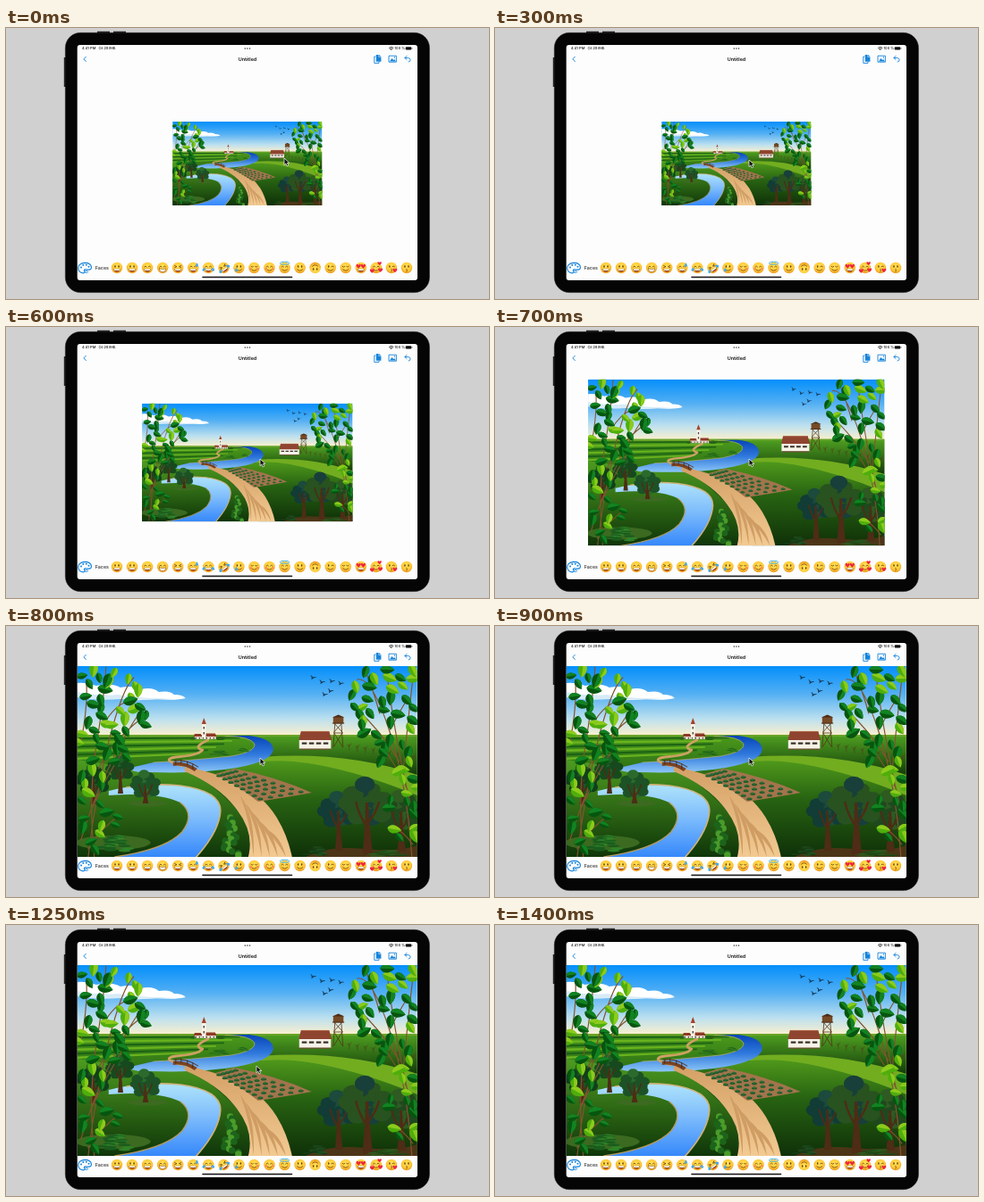
Write an HTML page that moves like this. It is 540x304 px and loops after 1450 ms.

```html
<!DOCTYPE html>
<html lang="en">
<head>
<meta charset="utf-8">
<title>Tablet zoom</title>
<style>
html, body { margin: 0; width: 100%; height: 100%; overflow: hidden; background: #d0d0d0; }
svg { display: block; width: 100vw; height: 100vh; }
text { font-family: Inter, Roboto, sans-serif; fill: #111; }
</style>
</head>
<body>
<svg viewBox="0 0 540 304">
  <defs>
    <linearGradient id="sky" x2="0" y2="1"><stop stop-color="#048ffb"/><stop offset=".4" stop-color="#55b0f3"/><stop offset=".75" stop-color="#bce0ef"/><stop offset="1" stop-color="#fff1cb"/></linearGradient>
    <linearGradient id="land" x2="0" y2="1"><stop stop-color="#4c9a1c"/><stop offset=".3" stop-color="#2c7014"/><stop offset=".65" stop-color="#1b4a0d"/><stop offset="1" stop-color="#0b2606"/></linearGradient>
    <linearGradient id="hill" x2="0" y2="1"><stop stop-color="#4f981b"/><stop offset=".4" stop-color="#276312"/><stop offset="1" stop-color="#0f3008"/></linearGradient>
    <linearGradient id="bank" x2="0" y2="1"><stop stop-color="#4d9c20"/><stop offset="1" stop-color="#0f3509"/></linearGradient>
    <linearGradient id="far" x2="0" y2="1"><stop stop-color="#0745b8"/><stop offset=".5" stop-color="#2f78dc"/><stop offset="1" stop-color="#8cc6f8"/></linearGradient>
    <linearGradient id="near" x2="0" y2="1"><stop stop-color="#aee3fa"/><stop offset=".45" stop-color="#7fbdfc"/><stop offset="1" stop-color="#3588fb"/></linearGradient>
    <linearGradient id="sand" x2="0" y2="1"><stop stop-color="#d4a066"/><stop offset="1" stop-color="#f2ca92"/></linearGradient>
    <radialGradient id="face" cy=".38" r=".62"><stop stop-color="#ffe45c"/><stop offset=".65" stop-color="#ffc935"/><stop offset="1" stop-color="#ea951c"/></radialGradient>
    <clipPath id="frame"><path d="M80 45h380v214H80z"/></clipPath>
  </defs>
  <path fill="#d0d0d0" d="M0 0h540v304H0z"/>
  <path fill="#222" d="M102 3.8h14v3h-14zm18 0h14v3h-14zM64.8 33h3v33h-3z"/>
  <rect x="66.3" y="5.3" width="407.2" height="291.4" rx="17" fill="#050505" stroke="#2a2a2c" stroke-width=".5"/>
  <rect x="79.7" y="19" width="380.3" height="264" rx="3" fill="#fdfdfd"/>
  <g id="picture" clip-path="url(#frame)"></g>
  <g id="ui"></g>
  <path id="cursor" d="M0 0v7.6l1.8-1.6 1.3 2.9 1.6-.8-1.3-2.7h2.5z" fill="#111" stroke="#fff" stroke-width=".7"/>
</svg>
<script>
const $ = id => document.getElementById(id);
const fill = (d, color) => `<path d="${d}" fill="${color}"/>`;
const line = (d, color, width) =>
  `<path d="${d}" fill="none" stroke="${color}" stroke-width="${width}" stroke-linecap="round" stroke-linejoin="round"/>`;
const oval = (x, y, rx, ry, color) => `<ellipse cx="${x}" cy="${y}" rx="${rx}" ry="${ry}" fill="${color}"/>`;
const box = (x, y, w, h, color) => fill(`M${x} ${y}h${w}v${h}h${-w}z`, color);
const place = (x, y, art, angle = 0, scale = 1) =>
  `<g transform="translate(${x} ${y}) rotate(${angle}) scale(${scale})">${art}</g>`;
const times = (n, draw) => Array.from({ length: n }, (_, i) => draw(i)).join('');
const random = n => { const v = Math.sin(n * 127.1 + 3) * 43758.5453; return v - Math.floor(v); };

// Landscape
function tree(x, y, r, foot, color, light, seed) {
  const crown = times(18, i => {
    const a = i * 2.4, d = r * .72 * Math.sqrt(i / 18), s = r * (.24 + .14 * random(seed + i));
    return oval(x + d * Math.cos(a), y + d * Math.sin(a), s, s * .8, i % 4 == 3 ? light : color);
  });
  const bark = '#4e2c15', fork = y + r * .75;
  return crown + fill(`M${x - r * .17} ${foot}Q${x - r * .06} ${fork} ${x - r * .06} ${y}h${r * .1}Q${x + r * .08} ${fork} ${x + r * .2} ${foot}z`, bark) +
    line(`M${x} ${fork + r * .15}Q${x - r * .3} ${fork - r * .3} ${x - r * .4} ${y}M${x} ${fork}Q${x + r * .3} ${fork - r * .3} ${x + r * .42} ${y}`, bark, r * .08);
}

function bush(x, y, w, h, color, light) {
  return times(22, i => {
    const v = i / 21, side = (random(i + x) - .5) * w * (.2 + .7 * v);
    return oval(x + side, y + h * v, w * .17, h * .09, i % 3 ? color : light);
  });
}

const leafHalf = 'M-8 0C-5-7 3-6 9 0z', leafShape = leafHalf + 'M-8 0C-5 7 3 6 9 0z';
function leaf(x, y, seed) {
  const [dark, light] = random(seed + 5) > .72 ? ['#4fae0c', '#8ccb1c'] : ['#07550f', '#128322'];
  return place(x, y, fill(leafShape, dark) + fill(leafHalf, light), random(seed) * 150 - 30, .7 + .35 * random(seed + 9));
}
const leaves = (points, seed) => points.map(([x, y], i) =>
  leaf(x + 18 * random(seed + i) - 9, y + 9, seed + i * 2 + 100) + leaf(x, y, seed + i * 3)).join('');

const leftLeaves = [[98, 49], [115, 62], [121, 52], [137, 59], [148, 72], [85, 56], [89, 79], [106, 83], [139, 84],
  [150, 91], [128, 95], [151, 102], [107, 101], [118, 111], [92, 108], [134, 118], [127, 128], [101, 126], [85, 121],
  [113, 143], [97, 151], [131, 138], [85, 168], [108, 169], [92, 187], [105, 200], [125, 214], [107, 224], [95, 242], [87, 216]];
const rightLeaves = [[402, 51], [412, 59], [426, 49], [441, 58], [455, 50], [391, 68], [404, 82], [421, 85], [448, 83],
  [432, 71], [390, 91], [407, 98], [398, 111], [438, 99], [455, 106], [414, 122], [429, 128], [443, 133], [422, 142],
  [451, 152], [439, 163], [456, 172], [448, 188], [430, 195], [456, 202], [434, 228], [457, 226]];

const twigs = 'M92 260Q100 190 115 130T143 58M99 260Q92 190 101 135T112 46M84 240Q108 160 152 93' +
  'M84 130Q92 90 90 60M104 160Q118 130 150 105M96 205Q112 170 132 138M92 250Q108 225 128 212M110 110Q120 90 139 83';
const rightTwigs = 'M454 260Q449 180 429 118T393 60M455 210Q437 140 425 46M440 152Q420 118 391 92' +
  'M444 166Q450 100 456 52M452 190Q438 158 412 121M455 245Q444 230 434 226M430 116Q440 96 449 82M418 98Q412 76 402 50';

const bird = fill('M-4.5-1.5Q-2-2.5 0-.6Q1.5-3 4.5-3Q2-1.5 1 .8L0 3-1 .8Q-2-1-4.5-1.5z', '#143a58');
const birds = [[343, 58], [353, 63], [364, 62], [374, 64.5], [356, 77], [362.5, 73]];

const church =
  fill('M211 121h7l2 4h-10zM223 120.5h11l2 4h-14z', '#8f3a28') +
  box(211, 124, 8, 3, '#e6dccb') + box(224, 124, 11, 3, '#e6dccb') +
  box(219.2, 110, 4.6, 17, '#f8f2e6') + fill('M219 110l2.5-7 2.5 7z', '#a5402a') +
  box(220.8, 113, 1.4, 2.5, '#444') + box(220.8, 119, 1.4, 2.5, '#444') +
  times(6, i => box(212 + i * 4, 125, 1.2, 1.6, '#433')) + oval(240, 126, 5, 2, '#276218') + oval(209, 126, 3, 1.6, '#276218');

const barn = box(328, 127, 35.5, 11, '#f6f2e8') + fill('M330 118h31.5l3 10h-37z', '#8f4430') +
  line('M331 118.4h30', '#b5694a', .8) + box(328, 137.4, 35.5, 1.3, '#6d4b30') +
  times(4, i => box(331 + i * 8, 130.5, 5.5, 2.2, '#3a302a'));

const tower = line('M366 136l2-27M377 136l-2-27M368 110l8 9M375 110l-8 9M367 120l9 15M376 120l-9 15M367.5 120h9', '#553318', .8) +
  fill('M366 102h11.5v7.5h-11.5z', '#774925') + fill('M365 102.5l6.8-3 6.8 3z', '#4d2c16') + line('M365.5 109h12.5', '#4d2c16', 1);

const fields = times(6, i => fill(`M80 ${125 + i * 4.5}L${262 - i * 9} ${124.5 + i * 3.5}v1.7L80 ${127.4 + i * 4.5}z`, i % 2 ? '#6ab41f' : '#1c6314'));

const crops = times(5, row => times(8, col => {
  const u = (col + .5) / 8, v = (row + .5) / 5;
  const x = 254 - 21 * v + 87 * u - 38 * u * v, y = 161 + 26 * u + 6 * v + 4 * u * v;
  return oval(x, y, 3.1, 1.3, '#1f5a2a') + oval(x - .3, y - 1, 1.7, 1, '#2e7038');
}));

$('picture').innerHTML =
  box(80, 45, 380, 79, 'url(#sky)') +
  fill('M80 64Q91 63 101 67Q119 63 128 69Q143 66 151 71Q164 68 171 74Q184 72 188 77Q198 77 201 81Q190 84 168 82Q140 85 122 80Q100 83 80 77z', '#fff') +
  fill('M80 74Q105 79 125 77Q152 82 190 81Q160 84 128 82Q100 84 80 80z', '#d7ebf7') +
  birds.map(([x, y]) => place(x, y, bird, 30, .85)).join('') +
  box(80, 122, 380, 137, 'url(#land)') +
  box(80, 122, 380, 2.5, '#6ba529') + fields +
  fill('M290 124H460V170Q380 142 290 147z', 'url(#bank)') +
  fill('M285 147Q380 140 460 167V193Q390 166 282 152z', '#72ad20') +
  fill('M245 161Q290 145 345 155T460 190V259H290z', 'url(#hill)') +
  fill('M80 150Q140 160 210 163Q245 190 278 225L270 259H80z', 'url(#bank)') +
  // Upper river
  fill('M245 123Q273 124 278 132Q280 141 252 146Q205 151 165 153L135 160Q145 165 160 164Q220 166 258 159Q297 152 299 139Q299 126 272 123z', 'url(#far)') +
  line('M246 123.5Q273 124 278 132Q280 141 252 146Q205 151 165 153', '#b9b06a', .7) +
  bush(239, 140, 22, 5, '#1e5f18', '#37851f') + bush(265, 137, 14, 4, '#1e5f18', '#37851f') +
  line('M226 128Q208 136 220 139Q216 145 190 147Q172 150 197 157', '#cda064', 2.8) +
  // Lower river
  fill('M115 185Q155 175 195 179Q240 185 240 207Q239 230 213 259H122Q178 251 197 231Q212 211 195 198Q170 186 115 190z', 'url(#near)') +
  line('M135 181Q165 176 195 179Q240 185 240 207Q239 230 213 259', '#cdb277', 1.7) +
  line('M122 259Q178 251 197 231Q212 211 195 198', '#b29a5c', 1.3) +
  // Road
  fill('M200 158Q219 161 243 169Q284 184 303 215Q315 235 320 259H271Q278 232 259 207Q240 180 200 163z', 'url(#sand)') +
  times(5, i => fill(`M${262 + i * 6} ${190 + i * 9}Q${279 + i * 7} ${212 + i * 5} ${277 + i * 9} 259Q${274 + i * 7} ${222 + i * 4} ${262 + i * 6} ${190 + i * 9}z`, '#cf9d64')) +
  fill('M187 153Q200 151 214 160L211 163Q199 155 187 157z', '#7b4322') +
  line('M188 151Q201 149 215 158M190 151v4M196 150v4M203 152v4M209 155v5', '#4b2611', .9) +
  fill('M256 160Q302 169 342 187Q315 192 282 197Q258 178 234 166z', '#a2744c') + crops +
  church + barn + tower +
  times(9, i => line(`M${384 + i * 9} ${139 + i * 1.6}v-6m0 3l-2-3m2 2l2-3`, '#4d4a1b', .7)) +
  oval(120, 243, 42, 8, '#3b6a20') + oval(158, 199, 22, 3.5, '#3b6a20') +
  tree(98, 172, 20, 200, '#123f1c', '#1c5523', 3) +
  tree(128, 160, 16, 188, '#164a1e', '#22602a', 4) + tree(156, 178, 18, 199, '#1c5226', '#2b6a2c', 9) +
  bush(252, 215, 22, 42, '#1d641b', '#4a9c2a') + bush(122, 236, 42, 16, '#1a5c1d', '#2f8228') +
  fill('M335 259Q360 246 400 250T460 246V259z', '#4c3517') +
  tree(372, 207, 23, 252, '#123c36', '#1c4a3c', 2) + tree(442, 208, 26, 253, '#20481e', '#2f5a22', 7) +
  tree(404, 198, 31, 256, '#28521f', '#183f39', 5) +
  bush(348, 248, 30, 9, '#163c17', '#245321') + bush(428, 252, 50, 6, '#1d4a17', '#2c6321') +
  line(twigs, '#80542f', 1.2) + line(rightTwigs, '#80542f', 1.2) +
  leaves(leftLeaves, 11) + leaves(rightLeaves, 60);

// Emoji row
const ink = '#6b3a10';
const heart = (x, y, s) => place(x, y, fill('M0 2.4C-5-1-2-4 0-1.5C2-4 5-1 0 2.4z', '#ee263c'), 0, s);
const drop = (x, y, angle = 0) => place(x, y, fill('M0-2.3Q2.8 2 0 2.2Q-2.8 2 0-2.3z', '#3ba9f2'), angle);
const eyes = {
  dot: oval(-2, -1.5, .75, 1.2, ink) + oval(2, -1.5, .75, 1.2, ink),
  arc: line('M-3.5-1q1.4-2 2.6 0M.9-1q1.3-2 2.6 0', ink, .8),
  shut: line('M-3.5-1.5q1.4 1.6 2.6 0M.9-1.5q1.3 1.6 2.6 0', ink, .8),
  squint: line('M-3.6-2.5l2.4 1.2-2.4 1M3.6-2.5l-2.4 1.2 2.4 1', ink, .8),
  wink: oval(-2, -1.5, .75, 1.2, ink) + line('M.9-1.3q1.3-1.6 2.8 0', ink, .8),
  love: heart(-2.6, -1.6, .95) + heart(2.6, -1.6, .95)
};
const mouths = {
  open: fill('M-3.8 1Q0 2 3.8 1Q3.3 4.6 0 4.6Q-3.3 4.6-3.8 1z', ink) + fill('M-3.4 1.2Q0 2 3.4 1.2L2.8 2.9H-2.8z', '#fff') + oval(0, 4, 1.5, .5, '#e64a4d'),
  teeth: fill('M-3.8 1Q0 2 3.8 1Q3.3 4.7 0 4.7Q-3.3 4.7-3.8 1z', '#fff') + line('M-3.8 1Q0 2 3.8 1Q3.3 4.7 0 4.7Q-3.3 4.7-3.8 1z', ink, .5),
  smile: line('M-3 1.8Q0 4.8 3 1.8', ink, .8),
  kiss: line('M-.3 1.2q2 .6.2 1.4q2 .6-.2 1.5', ink, .7)
};
const blush = oval(-3.8, 1.2, 1.5, 1, '#f98552') + oval(3.8, 1.2, 1.5, 1, '#f98552');
const halo = `<ellipse cy="-5.2" rx="5.3" ry="1.5" fill="none" stroke="#48b5ee" stroke-width="1"/>`;
const faces = [
  ['dot', 'open'], ['dot', 'open'], ['arc', 'open'], ['arc', 'teeth'], ['squint', 'open'],
  ['arc', 'open', drop(4.2, -3.5)], ['arc', 'open', drop(-5, 1.6, 35) + drop(5, 1.6, -35)],
  ['squint', 'open', drop(-5, 1, 35) + drop(5, 1, -35), -35], ['dot', 'smile', drop(-3, 2)],
  ['shut', 'smile', blush], ['arc', 'smile', blush], ['arc', 'smile', halo], ['dot', 'smile'],
  ['dot', 'smile', '', 180], ['wink', 'smile'], ['shut', 'smile'], ['love', 'open'],
  ['arc', 'smile', blush + heart(-4.5, 3.7, .9) + heart(4.8, 2.7, .9) + heart(3.8, -4.7, .8)],
  ['wink', 'kiss', heart(4, 3, .9)], ['dot', 'kiss']
];
const emoji = ([eye, mouth, extra = '', angle], i) =>
  place(124 + i * 17.05, 269, oval(0, 0, 6.2, 6.2, 'url(#face)') + eyes[eye] + mouths[mouth] + extra, angle);

// App chrome
const blue = '#1684dc';
const label = (x, y, size, weight, words, anchor = 'start') =>
  `<text x="${x}" y="${y}" font-size="${size}" font-weight="${weight}" text-anchor="${anchor}">${words}</text>`;

$('ui').innerHTML =
  label(85, 24.3, 4, 500, '4:41 PM') + label(103.5, 24.3, 3.8, 500, 'Сб 28 янв.') +
  times(3, i => oval(267.3 + i * 2.6, 23, .75, .75, '#333')) +
  line('M428.4 22.2q2.3-2 4.6 0M429.4 23.4q1.3-1 2.6 0', '#111', .8) + oval(430.7, 24.4, .5, .5, '#111') +
  label(434.5, 24.3, 3.9, 500, '100 %') +
  '<rect x="446.7" y="21.2" width="6.6" height="3.3" rx=".9" fill="#111"/>' + box(453.7, 22.2, .6, 1.3, '#111') +
  label(270, 36.8, 5.4, 600, 'Untitled', 'middle') +
  line('M89.4 32.2l-2.5 2.7 2.5 2.7', blue, .9) +
  fill('M413.8 30h3.3l2.3 2.3v5.5h-5.6z', blue) + line('M413 32h-1.2v7.4h5.2v-1', blue, .9) + line('M416.8 30.3v2.2h2.2', '#fff', .5) +
  line('M428.4 31.2h8v7h-8z', blue, .9) + fill('M429 37.5l2.4-3.4 1.8 2 1-1 1.8 2.4z', blue) + oval(434.4, 33, .7, .7, blue) +
  line('M448 31.5l-2.2 2 2.2 2M446 33.5h3.7q2.4.3 2.4 2.3t-2 2.2', blue, .9) +
  line('M88 263.3C77 264 80 276 87 274.8Q89 274 87.5 272.5Q87 270.5 90 271Q95.5 272 95.5 268.5Q95 263.3 88 263.3z', blue, 1.2) +
  [[84, 268.5], [86.3, 266], [89.8, 265.8], [92.5, 267.8]].map(([x, y]) => oval(x, y, 1, 1, blue)).join('') +
  line('M89 272.5q2.5-1 2.8 1.2q-1 1.5-3 .8', blue, .8) +
  label(99.8, 271, 5.4, 400, 'Faces') +
  faces.map(emoji).join('') +
  line('M220 279.5h99.5', '#111', 1.6);

// Motion
const LOOP = 1450;
const ease = (t, from, to) => {
  const p = Math.min(1, Math.max(0, (t - from) / (to - from)));
  return p * p * (3 - 2 * p);
};

function draw(now) {
  const t = now % LOOP;
  const scale = .44 + .56 * ease(t, 480, 800);
  $('picture').setAttribute('transform', `translate(269.8 152) scale(${scale}) translate(-270 -152)`);
  const arrive = ease(t, 0, 270), leave = ease(t, 1120, 1380);
  $('cursor').setAttribute('transform', `translate(${311 - 27 * arrive - 8 * leave} ${146 + 2 * arrive + 20 * leave})`);
  $('cursor').setAttribute('visibility', t < 1350 ? 'visible' : 'hidden');
  requestAnimationFrame(draw);
}
requestAnimationFrame(draw);
</script>
</body>
</html>
```
